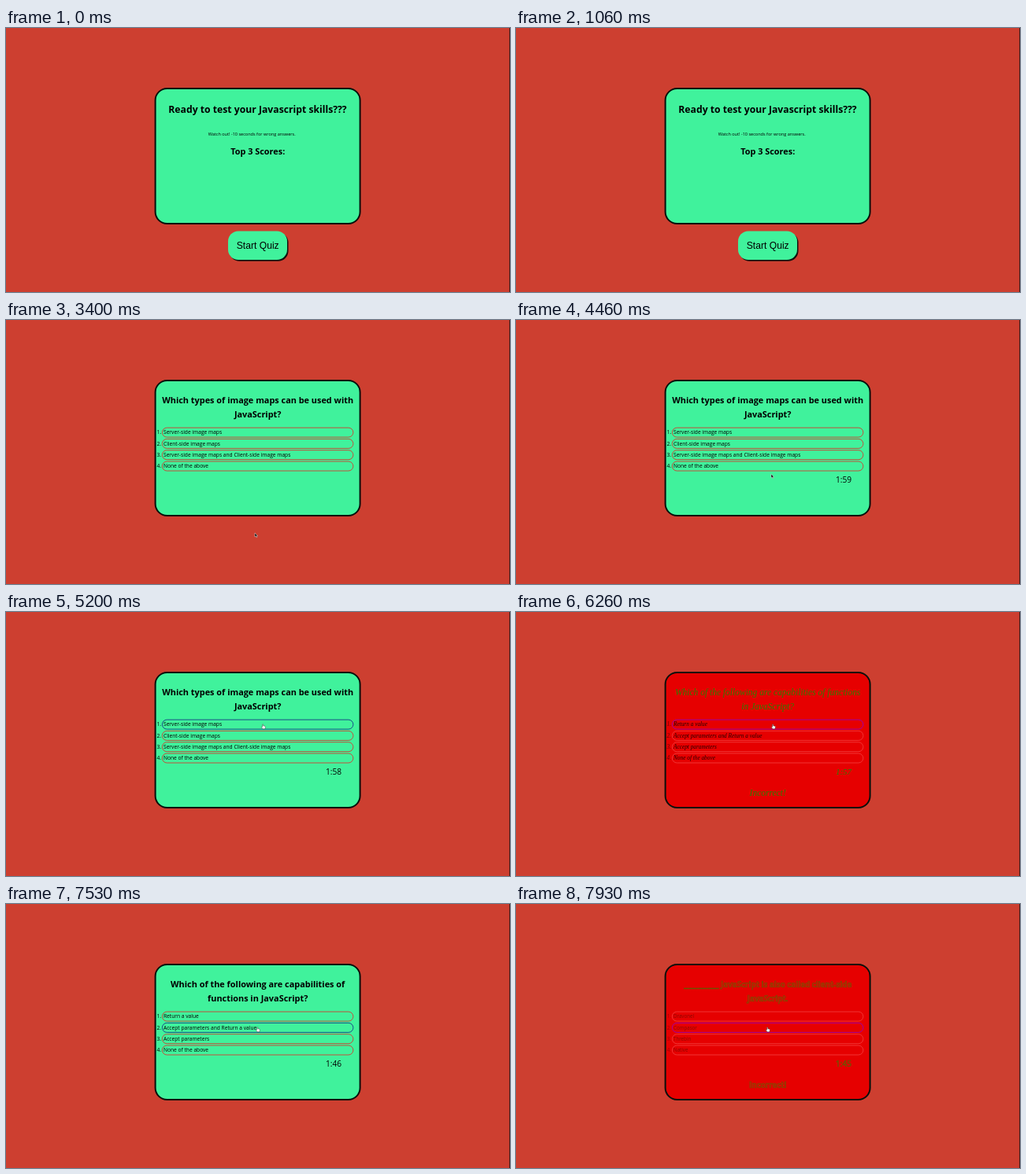
Animation, 640 px wide and 336 px high, one loop 8000 ms. Source, as an HTML page:

```html
<!DOCTYPE html>
<html lang="en">
<head>
<meta charset="utf-8">
<title>Quiz</title>
<style>
  html, body { margin: 0; width: 100%; height: 100%; overflow: hidden; background: #cd3f30; }
  svg { display: block; width: 100%; height: 100%; }
  text { font-family: "Open Sans", "Noto Sans", sans-serif; white-space: pre; }
  .cursive text { font-family: "Liberation Serif", serif; font-style: italic; }
  .outline .big { fill: #d81400; stroke: #6f5200; stroke-width: .6; }
</style>
</head>
<body>
<svg id="stage" viewBox="0 0 640 336"></svg>
<script>
const LOOP = 8000;
const stage = document.getElementById("stage");

const GREEN = "#40f29c", RED = "#cd3f30", ALERT = "#e60000";

const questions = [
  { lines: ["Which types of image maps can be used with", "JavaScript?"],
    answers: ["Server-side image maps", "Client-side image maps",
      "Server-side image maps and Client-side image maps", "None of the above"] },
  { lines: ["Which of the following are capabilities of", "functions in JavaScript?"],
    alertLines: ["Which of the following are capabilities of functions", "in JavaScript?"],
    answers: ["Return a value", "Accept parameters and Return a value",
      "Accept parameters", "None of the above"] },
  { lines: ["___________ JavaScript is also called client-side", "JavaScript."],
    answers: ["Dravonel", "Compasor", "Threbin", "Native"] }
];

const plain = { name: "", head: 10.9, item: 6.65, timer: 10.2, weight: 700,
  ink: "#000", itemInk: "#000", numInk: "#000", line: RED, hover: "#173a86" };
const cursive = { name: "cursive", head: 11.5, item: 7.3, timer: 11, weight: 400,
  ink: "#2f7d00", itemInk: "#2a0000", numInk: "#6a0000", line: "#f23a3a", hover: "#9a00b4" };
const outline = { name: "outline", head: 9.8, item: 6.2, timer: 10, weight: 700,
  ink: "#6f5200", itemInk: "#8a0800", numInk: "#a00000", line: "#f23a3a", hover: "#9a00b4" };

// Time, x, y of the pointer
const path = [
  [1930, 313, 267], [2260, 316, 271], [3930, 316, 271], [4460, 324, 196],
  [4600, 324, 196], [5200, 327, 146], [6930, 327, 146], [7560, 320, 160], [LOOP, 320, 160]
];

// Time, label of the countdown
const ticks = [[3930, "1:59"], [4930, "1:58"], [5930, "1:57"], [6800, "1:46"], [7800, "1:45"]];

const text = (s, x, y, size, o = {}) =>
  `<text class="${o.cls || ""}" x="${x}" y="${y}" font-size="${size}" fill="${o.fill || "#000"}"` +
  ` font-weight="${o.weight || 400}" text-anchor="${o.anchor || "middle"}">${s}</text>`;

const box = (x, y, w, h, r, fill, extra = "") =>
  `<rect x="${x}" y="${y}" width="${w}" height="${h}" rx="${r}" fill="${fill}" ${extra}/>`;

function pointerAt(t) {
  if (t < path[0][0]) return null;
  const i = path.findIndex(p => p[0] > t);
  const [t0, x0, y0] = path[i - 1], [t1, x1, y1] = path[i];
  const u = (t - t0) / (t1 - t0), e = u * u * (3 - 2 * u);
  return { x: x0 + (x1 - x0) * e, y: y0 + (y1 - y0) * e };
}

const arrow = p => `<path transform="translate(${p.x.toFixed(2)} ${p.y.toFixed(2)})"
  d="M0 0V5L1.2 4L2 5.8L2.9 5.4L2.1 3.7H3.6Z" fill="#111" stroke="#ddd" stroke-width=".5"/>`;

const hand = p => `<path transform="translate(${p.x.toFixed(2)} ${p.y.toFixed(2)})"
  d="M-1.3 -3q.6 -.7 1 0V-1.2L2 -.7Q2.6 -.5 2.4 .6L1.8 2.8H-1L-2.6 .4Q-2.5 -.5 -1.3 .2Z"
  fill="#fff" stroke="#333" stroke-width=".45"/>`;

function startScreen(hover) {
  return text("Ready to test your Javascript skills???", 319.5, 107.7, 12.2, { weight: 700 }) +
    text("Watch out! -10 seconds for wrong answers.", 312.2, 136.5, 5.56) +
    text("Top 3 Scores:", 319.7, 160.6, 10.9, { weight: 700 }) +
    box(283.5, 260.3, 75, 36.5, 13, "#10140f", 'filter="url(#soft)"') +
    box(282, 258.5, 75, 36.5, 13, hover ? "#45ffab" : GREEN) +
    `<text x="319.7" y="281" font-size="12.15" text-anchor="middle"
      style="font-family:'Liberation Sans',Arial,sans-serif">Start Quiz</text>`;
}

function quizScreen(q, look, timer, hot) {
  const alert = look !== plain;
  const lines = alert && q.alertLines || q.lines;
  const head = { fill: look.ink, weight: look.weight, cls: "big" };
  let out = lines.map((s, i) => text(s, 319.7, 105.8 + 18 * i, look.head, head)).join("");
  const row = i => 143.1 + 14.3 * i;
  q.answers.forEach((s, i) => {
    const y = row(i);
    out += box(198.3, y - 6, 242.6, 12, 6, "none",
        `stroke="${i === hot ? look.hover : look.line}" stroke-width=".9"`) +
      text(i + 1 + ".", 197, y + 2.3, look.item, { fill: look.numInk, anchor: "end" }) +
      text(s, 200, y + 2.3, look.item, { fill: look.itemInk, anchor: "start" });
  });
  if (timer) out += text(timer, 416, 207, look.timer, { fill: look.ink, weight: alert ? 400 : 500, cls: "big" });
  if (alert) out += text("Incorrect!", 319.7, 233.6, look.head, head);
  return `<g class="${look.name}">${out}</g>`;
}

function scene(t) {
  const p = pointerAt(t);
  const started = t >= 3260;
  const look = t >= 7930 ? outline : t >= 6260 && t < 6800 ? cursive : plain;
  const q = questions[t < 6260 ? 0 : t < 7930 ? 1 : 2];
  const tick = ticks.filter(k => k[0] <= t).pop();
  const row = p ? Math.round((p.y - 145.5) / 14.3) : -1;
  const hot = started && row >= 0 && row < 4 ? row : -1;

  return `<defs><filter id="soft" x="-20%" y="-20%" width="140%" height="140%">
      <feGaussianBlur stdDeviation=".5"/></filter></defs>` +
    box(0, 0, 640, 336, 0, RED) +
    box(639, 0, 1, 336, 0, "#4c1c18") +
    box(189.6, 77, 260, 172, 15, look === plain ? GREEN : ALERT, 'stroke="#08100c" stroke-width="2"') +
    (started ? quizScreen(q, look, tick && tick[1], hot) : startScreen(p)) +
    (p ? (hot >= 0 ? hand : arrow)(p) : "");
}

let last = "";
function draw(now) {
  const next = scene(now % LOOP);
  if (next !== last) stage.innerHTML = last = next;
}

const start = performance.now();
function frame() {
  draw(performance.now() - start);
  requestAnimationFrame(frame);
}
frame();
</script>
</body>
</html>
```
